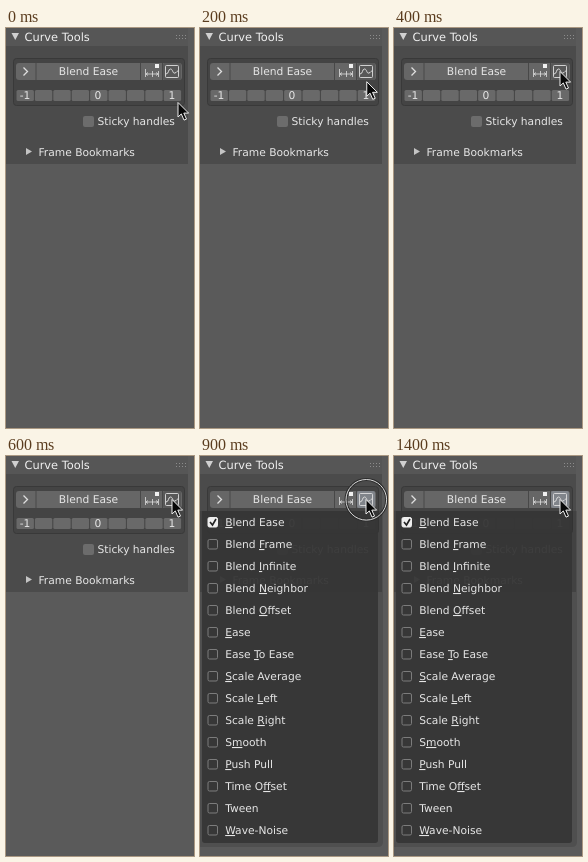
Animation, 188 px wide and 400 px high, one loop 2.3 s. Source, as an HTML page:

```html
<!DOCTYPE html>
<html lang="en">
<head>
<meta charset="utf-8">
<style>
html, body { margin: 0; width: 100%; height: 100%; overflow: hidden; background: #585858; }
svg { display: block; }
text { font: 10.7px "DejaVu Sans", sans-serif; fill: #e6e6e6; text-rendering: geometricPrecision; }
.title { font-size: 11.4px; fill: #f0f0f0; }
.mid { text-anchor: middle; }
.line { fill: none; stroke: #dedede; }
.key { text-decoration: underline #b0b0b0 .7px; }
</style>
</head>
<body>
<svg width="188" height="400" viewBox="0 0 188 400">
  <rect width="188" height="400" fill="#5a5a5a"/>
  <rect width="182" height="136" fill="#4b4b4b"/>
  <rect width="182" height="18" fill="#565656"/>
  <path d="M5.500 5h7.500l-3.750 7z" fill="#d0d0d0"/>
  <text class="title" x="18.500" y="13">Curve Tools</text>
  <path d="M170 7.500h12M170 10.500h12" stroke="#8c8c8c" stroke-dasharray="1 2"/>

  <rect x="7.500" y="30.500" width="171" height="47" rx="3" fill="#444" stroke="#393939"/>
  <rect x="10" y="35" width="166" height="17" rx="3" fill="#666"/>
  <rect id="hot" x="157" y="35" width="18" height="17" rx="2"/>
  <path d="M30 35v17M134.500 35v17M156.500 35v17" stroke="#484848"/>
  <path class="line" d="M17.500 39.500l4 4-4 4" stroke-width="1.300"/>
  <text class="mid" x="82.500" y="47">Blend Ease</text>
  <path class="line" d="M139.500 41v8M146.500 43v6M152.500 43v6M140 46h12M142 44.500l-2 1.500 2 1.500M150 44.500l2 1.500-2 1.500" stroke-width=".8"/>
  <rect x="149" y="36" width="4" height="4" fill="#f0f0f0"/>
  <rect class="line" x="159.500" y="37.500" width="13" height="12" rx="1" stroke-width=".9"/>
  <path class="line" d="M160 46c3 0 2-5 4.500-5s2 5 4.500 4 1.500-2 3.500-2"/>
  <g id="cells"></g>
  <g class="mid">
    <text x="19" y="71">-1</text><text x="92" y="71">0</text><text x="166" y="71">1</text>
  </g>

  <rect x="77" y="88" width="11" height="11" rx="2" fill="#6c6c6c"/>
  <text x="91.500" y="97">Sticky handles</text>
  <path d="M20 120l6 3.500-6 3.500z" fill="#c4c4c4"/>
  <text x="32.500" y="128">Frame Bookmarks</text>

  <g id="menu">
    <path d="M0 55h183v331q0 5-5 5h-178z" opacity=".12"/>
    <path d="M2 55h176v329q0 3-3 3h-170q-3 0-3-3z" fill="#363636" opacity=".94"/>
  </g>
  <g id="ring" fill="none">
    <circle cx="166.300" cy="43.800" r="20.300" stroke="#2c2c2c" stroke-width="3"/>
    <circle cx="166.300" cy="43.800" r="20.300" stroke="#d8d8d8"/>
  </g>
  <path id="cursor" d="M0 0v14.500l3.300-3.100 2.700 6.200 2.500-1-2.700-6h4.800z" fill="#080808" stroke="#eee"/>
</svg>
<script>
const $ = id => document.getElementById(id);

// The underscore precedes the underlined shortcut letter.
const items = ["_Blend Ease", "Blend _Frame", "Blend _Infinite", "Blend _Neighbor", "Blend _Offset",
  "_Ease", "Ease _To Ease", "_Scale Average", "Scale _Left", "Scale _Right", "S_mooth",
  "_Push Pull", "Time O_ffset", "Tween", "_Wave-Noise"];

for (let i = 0; i < 9; i++)
  $("cells").innerHTML +=
    `<rect x="${10.5 + i * 18.4}" y="62" width="17.4" height="11" rx="1.5" fill="#696969"/>`;

$("menu").innerHTML += items.map((item, i) => {
  const y = 66 + 22 * i;
  const label = item.replace(/_(.)/, '<tspan class="key">$1</tspan>');
  const box = `<rect x="8" y="${y - 4.5}" width="9.5" height="9.5" rx="1.5"
    fill="${i ? "none" : "#eee"}" stroke="${i ? "#7c7c7c" : "#eee"}"/>`;
  const tick = i ? "" : `<path d="M10 ${y}l2.5 3 3.5-6" fill="none" stroke="#222" stroke-width="1.6"/>`;
  return `${box}${tick}<text x="25.2" y="${y + 4}">${label}</text>`;
}).join("");

const show = (id, on) => $(id).setAttribute("visibility", on ? "visible" : "hidden");

function draw(now) {
  const t = Math.floor(now % 2300 / 100) * 100;
  const left = 1 - Math.min(t / 400, 1);
  const x = 166 + 6 * left ** 3;
  const y = 43.5 + 31 * left ** 1.6;
  $("cursor").setAttribute("transform", `translate(${x} ${y})`);
  $("hot").setAttribute("fill", t >= 900 ? "#80848a" : "#585858");
  show("menu", t >= 900);
  show("ring", t === 900);
  requestAnimationFrame(draw);
}
draw(0);
</script>
</body>
</html>
```
